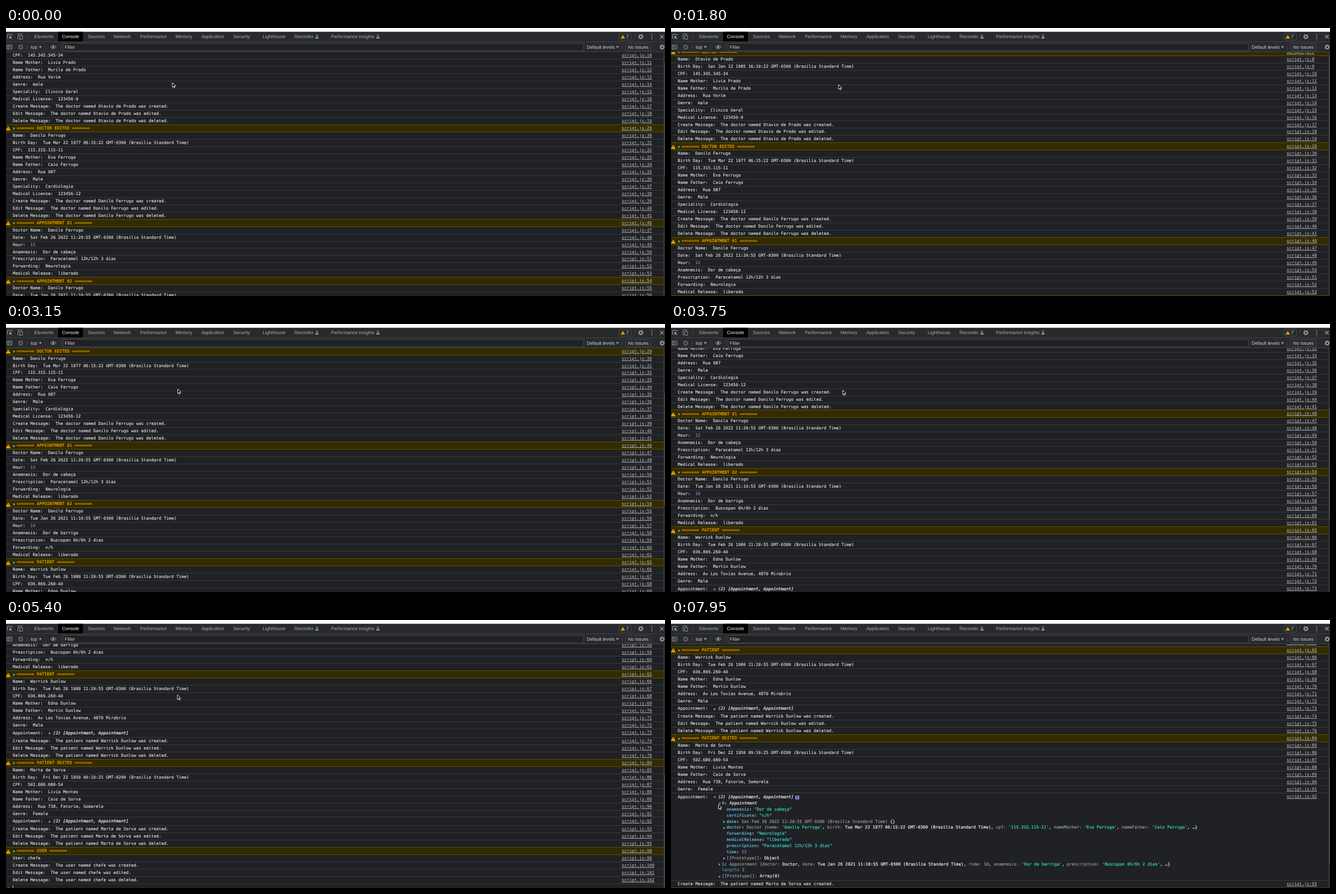
These frames come from a looping animation (1172x478 px, 8 s). An HTML page:

```html
<!DOCTYPE html>
<html lang="en">
<head>
<meta charset="utf-8">
<title>Console</title>
<style>
  html, body { margin: 0; width: 100%; height: 100%; overflow: hidden; background: #202124; }
  #stage { position: relative; width: 1172px; height: 478px; overflow: hidden; text-rendering: geometricPrecision; }
  #bar { position: absolute; left: 0; top: 0; font: 8.25px "Liberation Sans", Arial, sans-serif; fill: #9aa0a6; }
  #bar .lit { fill: #cfd2d6; }
  #view { position: absolute; left: 0; top: 43px; width: 1172px; height: 435px; overflow: hidden; }
  #list, #tail { position: absolute; left: 0; top: 0; width: 1169px; }
  #list { font: 7.452px/12.98px "DejaVu Sans Mono", monospace; color: #ececec; white-space: pre; -webkit-text-stroke: .1px; }
  .row { position: absolute; left: 0; width: 1169px; box-sizing: border-box; border-bottom: 1px solid #37393c; }
  .row > * { position: absolute; top: 0; }
  .text { left: 12px; }
  .link { left: 1095px; color: #b0b3b7; text-decoration: underline; }
  .warn { background: #332b00; border-color: #5f4f04; box-shadow: 0 -1px #5f4f04; color: #ffa600; }
  .warn .text { left: 19px; top: .2px; -webkit-text-stroke: .18px; }
  .row > .sign { left: .3px; top: 2.6px; }
  .tri { position: absolute; width: 3.4px; height: 4.6px; background: #9aa0a6; clip-path: polygon(0 0, 100% 50%, 0 100%); }
  .warn .tri { left: 13px; top: 4.2px; }
  .array .text { top: .7px; }
  .array > .tri { left: 76.3px; top: 5px; }
  .tri.down { transform: rotate(90deg); }
  .array em { -webkit-text-stroke: .22px; color: #f4f4f4; }
  .info { left: 221px; top: 3.7px; width: 7.2px; height: 7.2px; border-radius: 1.5px; background: #7c8fe6;
          color: #202124; font-weight: bold; font-size: 6px; line-height: 7.2px; text-align: center; }
  .row > .tree { left: 0; top: 13px; line-height: 10.84px; -webkit-text-stroke: .22px; }
  .leaf { position: absolute; left: 90.5px; }
  .leaf.deep { left: 98.7px; }
  .leaf .tri { left: -5.8px; top: 3.2px; }
  .key { color: #5db0d7; font-weight: bold; -webkit-text-stroke: 0; }
  .faint { color: #4788a6; }
  .dim { color: #a2a8ae; -webkit-text-stroke: .1px; }
  .str { color: #35d4c7; }
  .num { color: #9980ff; }
  #prompt { position: absolute; left: 0; }
  #caret { position: absolute; left: 12px; width: 1px; height: 10px; background: #d0d0d0; }
  #track { position: absolute; right: 0; top: 0; width: 2px; height: 100%; background: #2b2c2e; border-left: 1px solid #3a3b3d; }
  #thumb { position: absolute; left: 1px; width: 6px; border-radius: 3px; background: #5d5e60; }
  #cursor { position: absolute; left: -1px; top: -1px; overflow: visible; }
</style>
</head>
<body>
<div id="stage">
  <div id="view">
    <div id="list"><div id="tail"></div></div>
    <div id="track"><div id="thumb"></div></div>
  </div>

  <svg id="bar" width="1172" height="43">
    <defs>
      <g id="flask"><path d="M-1.5 -3.2h3M-.8 -3v2.2L-2.7 2.8h5.4L.8 -.8V-3" fill="none" stroke="#9aa0a6" stroke-width=".8"/><path d="M-1.6 .8h3.2l1.1 2h-5.4z"/></g>
      <g id="gear" fill="none" stroke="#9aa0a6"><circle r="2.7" stroke-width="1.7"/><circle r="4" stroke-width="1.2" stroke-dasharray="1.6 1.54"/></g>
      <path id="drop" d="M-2.4 -1.8h4.8L0 2.2z"/>
      <g id="alert"><path d="M0 -3.3L3.7 3.2h-7.4z" fill="#fbbc04" stroke="#fbbc04" stroke-width=".5" stroke-linejoin="round"/><path d="M0 -1.2v2.2M0 1.7v.8" stroke="#332b00" stroke-width=".9"/></g>
    </defs>
    <rect width="1172" height="43" fill="#292a2d"/>
    <rect width="1172" height="6.7" fill="#fff"/>
    <rect x="92.7" y="6.7" width="44.1" height="17.8" fill="#000"/>
    <path d="M0 24.5h1172M0 42.5h1172" stroke="#3f4144"/>
    <path d="M37.5 29v10M70.5 29v10M97.5 29v10M1096.5 29v10M38.5 10v10M1118.5 10v10" stroke="#44464a" stroke-width=".8"/>

    <g fill="none" stroke="#9aa0a6" stroke-width=".9">
      <path d="M4.5 18.5H2.5V11.5H10.5V14"/>
      <path d="M5.5 14l5.5 2.2-2.3.8 2 2.3-.8.7-2-2.3-1.2 1.8z" fill="#9aa0a6" stroke="none"/>
      <path d="M23 19.5H21.5V10.5H28V12.5M24.5 13.5h5v6.5h-5z"/>
      <path d="M2 30.5h8.5v7H2zM4.3 30.5v7"/><path d="M6.2 32.4v3.2l2.6-1.6z" fill="#9aa0a6" stroke="none"/>
      <circle cx="26" cy="34" r="3.7"/><path d="M23.4 31.4l5.2 5.2"/>
      <path d="M79 34q5-6 10 0q-5 6-10 0z"/><circle cx="84" cy="34" r="1.5" fill="#9aa0a6"/>
      <path d="M1163.5 12.5l6 6m0-6l-6 6" stroke-width="1.1"/>
    </g>
    <g fill="#9aa0a6"><circle cx="1148.5" cy="12" r=".9"/><circle cx="1148.5" cy="15.5" r=".9"/><circle cx="1148.5" cy="19" r=".9"/></g>
    <use href="#flask" x="553" y="15.5"/><use href="#flask" x="661.5" y="15.5"/>
    <use href="#gear" x="1129" y="15.5"/><use href="#gear" x="1167" y="34"/>

    <g id="tabs"></g>
    <rect x="1090.5" y="9.5" width="22" height="12" rx="1.5" fill="none" stroke="#45474b"/>
    <use href="#alert" x="1097" y="15.5" transform="translate(109.7 1.55) scale(.9)"/>
    <text x="1103" y="18.4" class="lit">7</text>

    <text x="44" y="37" class="lit">top</text><use href="#drop" x="61" y="34"/>
    <rect x="101.5" y="27.5" width="925.5" height="13" fill="#202124" stroke="#47494d"/>
    <text x="104.5" y="37" class="lit">Filter</text>
    <text x="1033" y="37" class="lit">Default levels</text><use href="#drop" x="1087.5" y="34"/>
    <rect x="1101.5" y="27.5" width="46" height="13" rx="2" fill="none" stroke="#45474b"/>
    <text x="1106.3" y="37" class="lit">No Issues</text>
  </svg>

  <svg id="cursor" width="8" height="12" viewBox="-1 -1 8 12">
    <path d="M0 0V8.2L1.9 6.5L3.1 9.3L4.4 8.7L3.2 6H5.8Z" fill="#000" stroke="#fff" stroke-width=".9"/>
  </svg>
</div>

<script>
const LOOP = 8000, PITCH = 12.98, LEAF = 10.84, TALL = 1.75, VIEW = 435;
const $ = id => document.getElementById(id);
const [key, faint, dim, str, num] = ['key', 'faint', 'dim', 'str', 'num']
  .map(c => text => `<span class="${c}">${text}</span>`);

// toolbar tabs
const tabs = { Elements: 50, Console: 99.5, Sources: 145.5, Network: 191.5, Performance: 238.5, Memory: 301.5,
  Application: 347.5, Security: 404, Lighthouse: 456.5, Recorder: 513, 'Performance insights': 578 };
$('tabs').innerHTML = Object.entries(tabs).map(([name, x]) =>
  `<text x="${x}" y="18.2" style="fill:${name === 'Console' ? '#fff' : '#a9aeb4'}">${name}</text>`).join('');

// log text: line number, then "!" heading, "@" array or " " plain
const at = (day, zone = '0300') => `${day} GMT-${zone} (Brasilia Standard Time)`;
const births = at('Tue Mar 22 1977 06:15:22');
const visits = [at('Sat Feb 26 2022 11:20:55'), at('Tue Jan 26 2021 11:10:55')];
const messages = (line, role, name) => ['Create', 'Edit', 'Delete'].map((verb, i) =>
  `${line + i} ${verb} Message:  The ${role} named ${name} was ${verb.toLowerCase().replace(/e$/, '')}ed.`).join('\n');

const log = `7!DOCTOR
8 Name:  Otavio de Prado
9 Birth Day:  ${at('Sat Jan 12 1985 16:10:22')}
10 CPF:  145.345.345-34
11 Name Mother:  Livia Prado
12 Name Father:  Murilo de Prado
13 Address:  Rua Vorim
14 Genre:  male
15 Speciality:  Clinico Geral
16 Medical License:  123456-9
${messages(17, 'doctor', 'Otavio de Prado')}
29!DOCTOR EDITED
30 Name:  Danilo Ferrugo
31 Birth Day:  ${births}
32 CPF:  115.315.115-11
33 Name Mother:  Eva Ferruga
34 Name Father:  Caio Ferrugo
35 Address:  Rua 987
36 Genre:  Male
37 Speciality:  Cardiologia
38 Medical License:  123456-12
${messages(39, 'doctor', 'Danilo Ferrugo')}
46!APPOINTMENT 01
47 Doctor Name:  Danilo Ferrugo
48 Date:  ${visits[0]}
49 Hour:  ${num(12)}
50 Anamnesis:  Dor de cabeça
51 Prescription:  Paracetamol 12h/12h 3 dias
52 Forwarding:  Neurologia
53 Medical Release:  liberado
54!APPOINTMENT 02
55 Doctor Name:  Danilo Ferrugo
56 Date:  ${visits[1]}
57 Hour:  ${num(10)}
58 Anamnesis:  Dor de barriga
59 Prescription:  Buscopan 6h/6h 2 dias
60 Forwarding:  n/h
61 Medical Release:  liberado
65!PATIENT
66 Name:  Warrick Dunlow
67 Birth Day:  ${at('Tue Feb 26 1980 11:20:55')}
68 CPF:  036.869.260-40
69 Name Mother:  Edna Dunlow
70 Name Father:  Martin Dunlow
71 Address:  Av Las Tovias Avenue, 4870 Mirabrio
72 Genre:  Male
73@
${messages(74, 'patient', 'Warrick Dunlow')}
84!PATIENT EDITED
85 Name:  Marta de Sorva
86 Birth Day:  ${at('Fri Dec 22 1950 09:10:25', '0200')}
87 CPF:  502.680.680-54
88 Name Mother:  Livia Montes
89 Name Father:  Caio de Sorva
90 Address:  Rua 738, Fatorim, Somarela
91 Genre:  Female
92@
${messages(93, 'patient', 'Marta de Sorva')}
98!USER
99 User: chefe
${messages(100, 'user', 'chefe')}`;

// object tree under the last array
const tri = '<span class="tri"></span>', down = '<span class="tri down"></span>';
const preview = (i, hour, pain, drug) => tri + key(i) + ': ' + dim('Appointment {doctor: ') + 'Doctor, ' + dim('date: ') +
  visits[i] + ', ' + dim('time: ') + num(hour) + ', ' + dim('anamnesis: ') + str(`'${pain}'`) + ', ' +
  dim('prescription: ') + str(`'${drug}'`) + ', …}';
const proto = type => tri + dim('[[Prototype]]: ') + type;
const field = (name, value) => key(name) + ': ' + value;
const first = preview(0, 12, 'Dor de cabeça', 'Paracetamol 12h/12h 3 dias');
const rest = [preview(1, 10, 'Dor de barriga', 'Buscopan 6h/6h 2 dias'), faint('length') + ': ' + num(2), proto('Array(0)')];
const fields = [
  field('anamnesis', str('"Dor de cabeça"')),
  field('certificate', str('"n/h"')),
  tri + field('date', dim(visits[0]) + ' {}'),
  tri + field('doctor', dim('Doctor {name: ') + str("'Danilo Ferrugo'") + ', ' + dim('birth: ') + births + ', ' +
    dim('cpf: ') + str("'115.315.115-11'") + ', ' + dim('nameMother: ') + str("'Eva Ferruga'") + ', ' +
    dim('nameFather: ') + str("'Caio Ferrugo'") + ', …}'),
  field('forwarding', str('"Neurologia"')),
  field('medicalRelease', str('"liberado"')),
  field('prescription', str('"Paracetamol 12h/12h 3 dias"')),
  field('time', num(12)),
  proto('Object')
];
const leaves = [[], [first, ...rest], [down + key(0) + ': Appointment', ...fields, ...rest]];
const trees = leaves.map((set, n) => `<div class="tree" hidden>` + set.map((html, i) =>
  `<div class="leaf${n === 2 && i > 0 && i <= fields.length ? ' deep' : ''}" style="top:${i * LEAF}px">${html}</div>`).join('') + '</div>');

const sign = '<svg class="sign" width="8" height="8" viewBox="-4 -4 8 8"><use href="#alert"/></svg>';
let y = 0, open, parent = $('list');
for (const line of log.split('\n')) {
  const [, n, kind, text] = line.match(/^(\d+)(.)(.*)$/);
  const row = document.createElement('div');
  const height = PITCH + (kind === '@' ? TALL : 0);
  row.className = 'row' + ({ '!': ' warn', '@': ' array' }[kind] || '');
  row.style.cssText = `top:${y}px;height:${height}px`;
  row.innerHTML = {
    '!': `${sign}${tri}<span class="text">======= ${text} =======</span>`,
    '@': `${tri}<span class="text">Appointment:    <em>(2) [Appointment, Appointment]</em></span>`,
    ' ': `<span class="text">${text}</span>`
  }[kind] + `<span class="link">script.js:${n}</span>`;
  parent.append(row);
  y += height;
  if (n === '92') {
    open = row;
    row.insertAdjacentHTML('beforeend', '<span class="info" hidden>i</span>' + trees.join(''));
    parent = $('tail');
  }
}
$('tail').insertAdjacentHTML('beforeend', `<div id="prompt" style="top:${y}px">
<svg width="10" height="14" style="position:absolute;left:0;top:0"><path d="M3 4l3 3-3 3" fill="none" stroke="#4f8ff0"/></svg></div>
<div id="caret" style="top:${y + 2}px"></div>`);
const total = y + 7.2;

// held steps: [time, value...]
const scrolls = [[0, 38.9], [300, 0], [1800, 6.3], [1950, 29], [2100, 57], [2250, 79], [2400, 91], [2550, 96.3],
  [2850, 112], [3000, 144], [3150, 169.2], [3300, 182], [3450, 187], [3750, 226], [3900, 330], [4050, 426.4],
  [4200, 465], [4350, 485], [4500, 494], [4650, 497], [7200, 509], [7350, 525], [7500, 536], [7650, 540.4]];
const moves = [[0, 296, 97.5], [1800, 298, 101], [1950, 300, 105], [2100, 302, 109], [2250, 304, 113], [2400, 305, 115],
  [2550, 305.5, 116], [3750, 305.4, 118], [4050, 305, 121], [4350, 305, 124], [4650, 305, 126.5], [5100, 305, 129],
  [5250, 305, 131], [5400, 305, 133.5], [5700, 298, 152], [5850, 262, 205], [6000, 200, 262], [6150, 135, 310],
  [6300, 98, 340], [6450, 84, 355], [6600, 78.5, 359.5], [7200, 79.5, 352], [7350, 81.5, 342], [7500, 83.5, 334], [7650, 84.5, 329]];
const blinks = [[0, 0], [4650, 1], [4800, 0], [5250, 1], [5700, 0], [6150, 1], [6600, 0]];
const states = [[0, 0], [6750, 1], [7950, 2]];
const pick = (steps, t) => steps.findLast(s => s[0] <= t).slice(1);

function draw(t) {
  const [scroll] = pick(scrolls, t), [x, top] = pick(moves, t), [state] = pick(states, t);
  const grow = leaves[state].length * LEAF, full = total + grow;
  $('list').style.top = -scroll + 'px';
  $('tail').style.top = grow + 'px';
  open.style.height = PITCH + TALL + grow + 'px';
  open.querySelectorAll('.tree').forEach((tree, i) => tree.hidden = i !== state);
  open.querySelector('.info').hidden = !state;
  open.firstElementChild.classList.toggle('down', state > 0);
  $('thumb').style.top = scroll * VIEW / full + 'px';
  $('thumb').style.height = VIEW * VIEW / full + 'px';
  $('caret').style.visibility = pick(blinks, t)[0] ? 'visible' : 'hidden';
  $('cursor').style.transform = `translate(${x}px, ${top}px)`;
}

let start;
function tick(now) {
  start ??= now;
  draw((now - start) % LOOP);
  requestAnimationFrame(tick);
}
draw(0);
requestAnimationFrame(tick);
</script>
</body>
</html>
```
